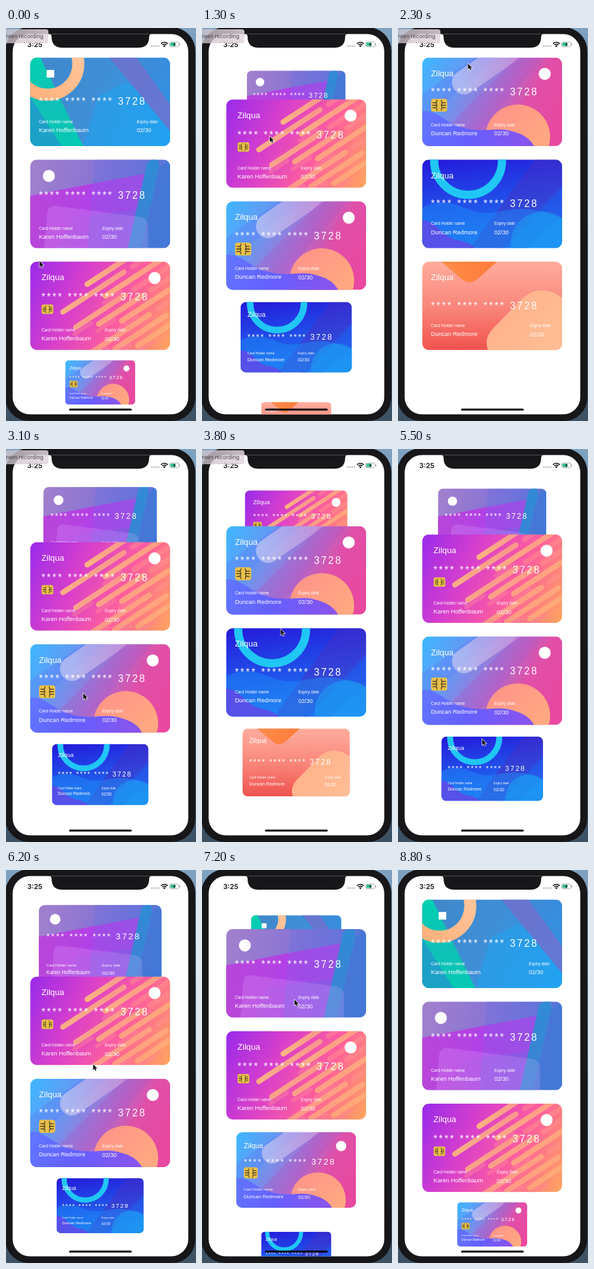
Animation, 300 px wide and 619 px high, one loop 8.9 s. Source, as an HTML page with a canvas:

```html
<!DOCTYPE html>
<html lang="en">
<head>
<meta charset="utf-8">
<title>Card stack</title>
<style>
html, body { margin: 0; width: 100%; height: 100%; overflow: hidden; background: #3d5163; }
canvas { display: block; width: 300px; height: 619px; }
</style>
</head>
<body>
<canvas id="stage"></canvas>
<script>
const W = 300, H = 619, LOOP = 8900;
const CARD_X = 38.2, CARD_W = 221, CARD_H = 139.3, TOP = 46.6, PITCH = 160.7;
const SANS = '"Liberation Sans", Arial, sans-serif';
const canvas = document.getElementById('stage');
const dpr = window.devicePixelRatio || 1;
canvas.width = W * dpr;
canvas.height = H * dpr;
const c = canvas.getContext('2d');

// Each swipe eases scroll and pointer to new values
const REST = { scroll: 0, x: 53, y: 367 };
const LAST = 3 * PITCH;
const swipes = [
  { from: 0, to: 500, x: 103, y: 300 },
  { from: 500, to: 2040, scroll: LAST, x: 110.5, y: 56 },
  { from: 2450, to: 3286, scroll: 184, x: 123.7, y: 432 },
  { from: 3330, to: 4030, scroll: LAST, x: 124.5, y: 234 },
  { from: 4030, to: 5903, scroll: 200, x: 134, y: 487 },
  { from: 5903, to: 6500, x: 141, y: 124 },
  { from: 6500, to: 8050, scroll: 0, x: 152.7, y: 311 },
  { from: 8100, to: 8650, x: 156, y: 640 }
];

const clamp = (v, a, b) => Math.min(b, Math.max(a, v));
const ease = u => u * u * (3 - 2 * u);

function poseAt(t) {
  const pose = { ...REST };
  for (const s of swipes) {
    const k = ease(clamp((t - s.from) / (s.to - s.from), 0, 1));
    for (const key in pose) pose[key] += ((s[key] ?? pose[key]) - pose[key]) * k;
  }
  return pose;
}

function grad(x1, y1, x2, y2, ...colors) {
  const g = c.createLinearGradient(x1, y1, x2, y2);
  colors.forEach((color, i) => g.addColorStop(i / (colors.length - 1), color));
  return g;
}
function rect(fill, x = 0, y = 0, w = CARD_W, h = CARD_H) {
  c.fillStyle = fill;
  c.fillRect(x, y, w, h);
}
function round(fill, x, y, w, h, r) {
  c.fillStyle = fill;
  c.beginPath();
  c.roundRect(x, y, w, h, r);
  c.fill();
}
function disc(fill, x, y, r) {
  c.fillStyle = fill;
  c.beginPath();
  c.arc(x, y, r, 0, 7);
  c.fill();
}
function ring(color, x, y, r, width) {
  c.strokeStyle = color;
  c.lineWidth = width;
  c.beginPath();
  c.arc(x, y, r, 0, 7);
  c.stroke();
}
function stripe(color, x1, y1, x2, y2, width) {
  c.strokeStyle = color;
  c.lineWidth = width;
  c.lineCap = 'round';
  c.beginPath();
  c.moveTo(x1, y1);
  c.lineTo(x2, y2);
  c.stroke();
}
function shape(fill, path) {
  c.fillStyle = fill;
  c.fill(new Path2D(path));
}
function text(str, x, y, size, spacing = 0) {
  c.font = `${size}px ${SANS}`;
  c.letterSpacing = spacing + 'px';
  c.fillStyle = '#fff';
  c.fillText(str, x, y);
  c.letterSpacing = '0px';
}

function chip(x, midY, width) {
  c.save();
  c.translate(x, midY - width * 0.4);
  c.scale(width / 25, width / 25);
  round('#e8c04a', 0, 0, 25, 20, 4);
  c.strokeStyle = '#4a3a20';
  c.lineWidth = 1.2;
  // One quadrant mirrored into four
  const quarter = new Path2D('M-10 0H-3.5Q-3.5 -4 -7 -4H-10M-3.5 -8V-6Q-3.5 -4 -6 -4');
  c.translate(12.5, 10);
  for (const sx of [1, -1]) {
    for (const sy of [1, -1]) {
      c.save();
      c.scale(sx, sy);
      c.stroke(quarter);
      c.restore();
    }
  }
  c.restore();
}

// Parallel slanted rows in three staggered columns
function slantedRows() {
  c.save();
  c.rotate(-0.577);
  for (let k = 0; k < 9; k++) {
    const y = 79 + k * 15.6;
    const start = k < 2 ? 56 * (1 - k) : 4 + 33 * ((k + 3) % 3);
    const end = start + 78 + (k * 37) % 48;
    const pale = `rgba(255,190,122,${0.92 - k * 0.05})`;
    stripe(grad(start, 0, end, 0, pale, 'rgba(255,176,128,.72)'), start, y, end, y, 8.5);
    stripe('rgba(255,150,140,.45)', end + 16, y, end + 90, y, 8);
    if (k > 1) stripe('rgba(255,135,150,.4)', start - 8, y + 8, start + 24, y + 8, 6.5);
  }
  c.restore();
}

const art = [
  () => {
    rect(grad(0, 0, 221, 110, '#3f86c8', '#3f8fd6', '#259df0'));
    shape(grad(0, 0, 60, 139, '#00d2b0', '#10bfb8', '#06c9b4'), 'M0 0H16L84 140H0Z');
    shape('rgba(40,140,210,.62)', 'M0 62L50 140H0Z');
    shape('rgba(30,165,242,.5)', 'M84 140L108 60L150 40L221 78V140Z');
    shape('rgba(112,112,205,.85)', 'M125 0H168L221 74V116Z');
    shape('rgba(70,130,210,.45)', 'M168 0H221V74Z');
    ring(grad(0, 70, 86, 0, '#ffae76', '#ffc69d'), 27.5, 10, 48.5, 19);
  },
  () => {
    rect(grad(0, 0, 221, 40, '#a280cd', '#8874d4', '#5376d8'));
    shape(grad(0, 100, 200, 40, '#b34bd5', '#a944e6', '#8b59e0'), 'M0 57L182 22L156 140H0Z');
    shape('rgba(100,110,225,.3)', 'M102 0H186L156 140H90Z');
    shape('rgba(196,60,225,.35)', 'M0 57L97 38L40 140H0Z');
    shape('rgba(190,60,235,.35)', 'M97 38L182 22L170 78L66 92Z');
    shape(grad(180, 0, 190, 140, '#308bd5', '#3e82d4'), 'M184 8Q187 0 195 0H199Q206 2 203 16L175 140H154Z');
    shape('rgba(62,120,216,.7)', 'M204 12L221 0V140H175Z');
    shape('rgba(225,185,255,.2)', 'M22 140L27 84Q29 71 41 73L172 90Q186 92 186 105V140Z');
  },
  () => {
    rect(grad(0, 15, 221, 125, '#9d2ce8', '#d83fcb', '#ff5f9b', '#ffa162'));
    slantedRows();
  },
  () => {
    rect(grad(0, 10, 200, 125, '#40b6ff', '#629af4', '#9b78d8', '#e04fa8', '#e8489f'));
    shape('rgba(90,120,245,.3)', 'M0 58L83 0H120L0 100Z');
    stripe(grad(60, 40, 150, 0, 'rgba(205,205,242,.65)', 'rgba(225,170,225,.5)'), 66, 39, 142, -14, 38);
    shape('rgba(175,80,195,.28)', 'M150 0H192L90 116L38 112Z');
    disc(grad(130, 75, 190, 139, '#ff9688', '#ffa981'), 151, 125, 51);
    shape(grad(0, 70, 160, 139, '#6178ff', '#645fff', '#8754ee'),
      'M0 84C25 82 38 106 70 112C105 119 118 108 145 117Q168 123 177 140H0Z');
  },
  () => {
    rect(grad(0, 0, 20, 139, '#2519da', '#2148e8', '#1f76f0'));
    shape('rgba(75,45,190,.45)', 'M178 0H221V45L130 140H75Z');
    shape('rgba(40,85,232,.5)', 'M221 40V90L165 140H120Z');
    shape('rgba(30,140,245,.45)', 'M0 76C45 52 70 87 105 84S165 67 221 94V140H0Z');
    shape('rgba(100,70,230,.8)', 'M0 96C22 94 30 123 57 127Q76 130 83 140H0Z');
    disc('rgba(28,166,244,.5)', 190, 132, 50);
    ring('#20c6f4', 72.5, 2, 53.5, 13);
  },
  () => {
    rect(grad(0, 0, 0, 139, '#ffad9d', '#f9877b', '#f0534e'));
    shape(grad(40, 0, 115, 20, '#ff8b48', '#ff7c3b'), 'M30 0L62 27Q74 38 88 27L118 0Z');
    shape(grad(120, 60, 210, 139, '#ffb18b', '#ffbd94'),
      'M104 140Q97 122 111 106L158 58Q175 42 197 46Q213 49 221 58V140Z');
  }
];

const BRAND = 'Zilqua', NAME_A = 'Karen Hoffenbaum', NAME_B = 'Duncan Redmore';
// Left edge, then baselines of number and labels
const low = { x: 13.7, num: 74.5, label: 103 };
const high = { x: 13.7, num: 61.4, label: 110.2 };
const cards = [
  { ...low, who: NAME_A, gap: 154.5, square: true },
  { ...high, who: NAME_A, mark: 29.5 },
  { ...high, x: 17.7, who: NAME_A, brand: true, mark: 196.5, chip: 18.5 },
  { ...high, num: 59.7, label: 108, who: NAME_B, brand: true, mark: 193.5, chip: 25.5 },
  { ...low, who: NAME_B, brand: true },
  { ...low, who: NAME_B, brand: true, gap: 156 }
];

function drawCard(card, i, scroll) {
  const y = TOP + i * PITCH - scroll;
  const above = clamp((TOP - y) / PITCH, 0, 1);
  const below = clamp((y - TOP) / PITCH - 2, 0, 1);
  const scale = 1 - (above + below) / 2;
  const midY = Math.max(y, TOP) + CARD_H / 2 - below * PITCH / 4;
  if (above === 1 || midY - CARD_H / 2 > H) return;
  c.save();
  c.translate(CARD_X + CARD_W / 2, midY);
  c.scale(scale, scale);
  c.translate(-CARD_W / 2, -CARD_H / 2);
  c.beginPath();
  c.roundRect(0, 0, CARD_W, CARD_H, 11);
  c.clip();
  art[i]();
  const expiry = card.x + (card.gap || 100);
  if (card.square) rect('#fff', 26, 19.5, 12, 12);
  if (card.mark) disc('#fff', card.mark, 25.7, 9.5);
  if (card.brand) text(BRAND, card.x, 29.3, 13.2);
  if (card.chip) chip(card.x + 0.3, 75, card.chip);
  text('**** **** **** 3728', card.x, card.num, 15.6, 2.6);
  text('Card Holder name', card.x, card.label, 6.6);
  text(card.who, card.x, card.label + 14.2, 9.4);
  text('Expiry date', expiry, card.label, 6.6);
  text('02/30', expiry, card.label + 14.8, 9.2);
  c.restore();
}

function drawStatus() {
  c.fillStyle = '#111';
  c.font = '600 11px Inter, sans-serif';
  c.fillText('3:25', 33.5, 30);
  for (let i = 0; i < 4; i++) disc('#b3b3b5', 230.5 + i * 3.4, 28.5, 1.2);
  c.strokeStyle = '#111';
  c.lineWidth = 1.7;
  c.lineCap = 'butt';
  for (const r of [4, 7]) {
    c.beginPath();
    c.arc(250, 29.5, r, -Math.PI * 0.77, -Math.PI * 0.23);
    c.stroke();
  }
  disc('#111', 250, 28.6, 1.4);
  c.strokeStyle = '#98989a';
  c.lineWidth = 0.8;
  c.beginPath();
  c.roundRect(258.5, 22, 14.5, 7.6, 2.2);
  c.stroke();
  rect('#98989a', 273.8, 24.5, 1.2, 2.8);
  round('#35c48b', 259.6, 23.1, 8, 5.4, 1.2);
  shape('#222', 'M266.8 22.4L263.5 26.3H265.6L264.8 29.4L268.2 25.3H266Z');
}

function drawNotice(t) {
  const out = clamp((t - 4600) / 500, 0, 1);
  if (out === 1) return;
  c.save();
  c.translate(-75 * out * out, 0);
  round(grad(0, 0, 67, 0, 'rgba(205,195,204,.76)', 'rgba(226,214,222,.86)'), -30, 2, 97, 22, 4);
  c.font = '8.5px Inter, sans-serif';
  c.fillStyle = '#4b454c';
  c.textAlign = 'right';
  c.fillText('Screen recording', 59, 16);
  c.restore();
}

function drawPointer(x, y) {
  if (y > H) return;
  c.save();
  c.translate(x, y);
  c.scale(0.9, 0.9);
  const arrow = new Path2D('M0 0V10.2L2.4 8L4.1 11.8L5.8 11L4.2 7.4H7.4Z');
  c.strokeStyle = '#fff';
  c.lineWidth = 1.4;
  c.stroke(arrow);
  c.fillStyle = '#111';
  c.fill(arrow);
  c.restore();
}

function draw(t) {
  const { scroll, x, y } = poseAt(t);
  c.setTransform(dpr, 0, 0, dpr, 0, 0);
  rect(grad(0, 0, 0, H, '#7fa2c0', '#4a6a8a', '#3d5163'), 0, 0, W, H);
  round('#171618', -1, -1, 300, 620, 37);
  c.save();
  c.beginPath();
  c.roundRect(10.5, 9.5, 277.3, 599, 27);
  c.fillStyle = '#fff';
  c.fill();
  c.clip();
  cards.forEach((card, i) => drawCard(card, i, scroll));
  shape('#171618', 'M67 9Q72 9.5 72 14Q72 31 89 31H209Q226 31 226 14Q226 9.5 231 9Z');
  drawStatus();
  round('#000', 99.5, 599.5, 99, 3, 1.5);
  c.restore();
  drawNotice(t);
  drawPointer(x, y);
}

const start = performance.now();
function tick() {
  draw((performance.now() - start) % LOOP);
  requestAnimationFrame(tick);
}
tick();
</script>
</body>
</html>
```
